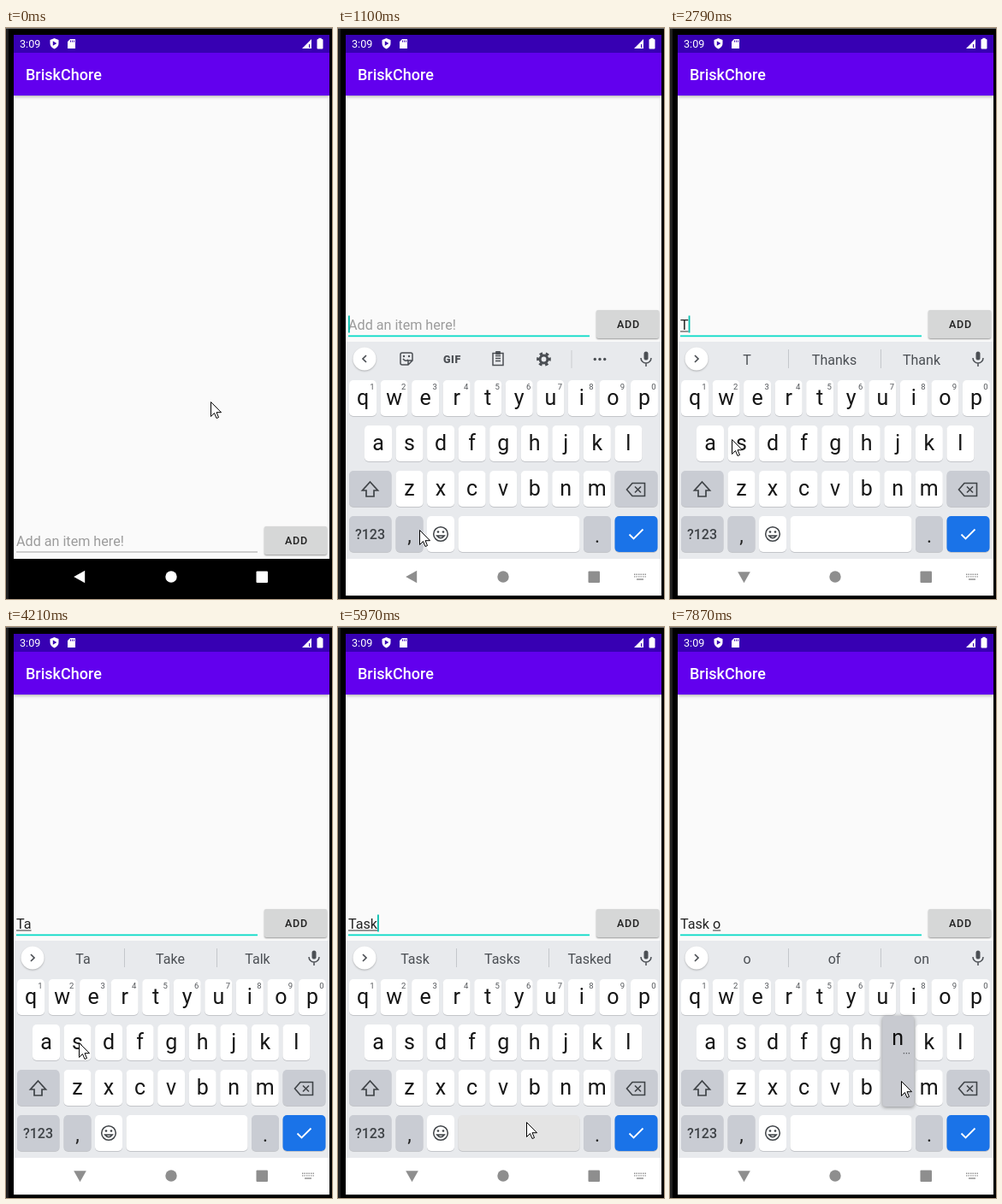
An HTML page with a canvas that plays this animation: 381 px wide and 668 px high, repeating every 7990 ms.

```html
<!DOCTYPE html>
<html lang="en">
<head>
<meta charset="utf-8">
<title>To-do list typing</title>
<style>
html, body { margin: 0; height: 100%; overflow: hidden; background: #000; }
canvas { display: block; width: 381px; height: 668px; }
</style>
</head>
<body>
<canvas id="stage"></canvas>
<script>
const W = 381, H = 668, LOOP = 7990;
const canvas = document.getElementById('stage');
const g = canvas.getContext('2d');
const dpr = window.devicePixelRatio || 1;
canvas.width = W * dpr;
canvas.height = H * dpr;

const ticks = [0];
for (const [a, b, n] of [[130, 1100, 8], [1220, 1760, 5], [2160, 2790, 6], [2940, 3090, 2],
  [3220, 4210, 8], [4360, 5330, 8], [5450, 5970, 5], [6120, 6380, 2], [6530, 6780, 2], [7060, 7870, 7]])
  for (let i = 0; i < n; i++) ticks.push(Math.round(a + (b - a) * i / (n - 1)));

const FOCUS = 680, OPEN = 960, OPENED = 1100;
const pointer = [[0, 239, 437], [680, 97, 587], [820, 97, 587], [1100, 95, 587], [1620, 35, 537],
  [2160, 35, 537], [2410, 172, 432], [2540, 172, 432], [2790, 72, 481], [3000, 42, 483],
  [3490, 42, 484], [3900, 85, 486], [4490, 85, 486], [5200, 304, 487], [5580, 304, 487],
  [5900, 220, 579], [6120, 220, 579], [6380, 311, 444], [6530, 318, 441], [7195, 320, 440],
  [7600, 270, 531], [LOOP, 270, 531]];

// [time, finished text, word being composed, suggestions]
const edits = [[FOCUS, '', '', null],
  [2540, '', 'T', ['T', 'Thanks', 'Thank']],
  [3490, '', 'Ta', ['Ta', 'Take', 'Talk']],
  [4490, '', 'Tas', ['Tas', 'Task', 'Taste']],
  [5570, '', 'Task', ['Task', 'Tasks', 'Tasked']],
  [6120, 'Task ', '', ['is', 'force', 'for']],
  [7190, 'Task ', 'o', ['o', 'of', 'on']]];
const presses = [[2160, 2290, 'shift'], [2410, 2540, 't'], [3350, 3490, 'a'], [4360, 4490, 's'],
  [5450, 5570, 'k'], [5970, 6120, 'space'], [7060, 7190, 'o'], [7870, LOOP, 'n']];

const rows = ['qwertyuiop', 'asdfghjkl', 'zxcvbnm'];
const rowX = [13, 31, 67.5], PITCH = 36.55, KEY_W = 32, KEY_H = 42;
const rowY = r => 412 + 53 * r;

function box(x, y, w, h, fill, r = 0) {
  g.fillStyle = fill;
  g.beginPath();
  g.roundRect(x, y, w, h, r);
  g.fill();
}
function disc(x, y, r, fill) {
  g.fillStyle = fill;
  g.beginPath();
  g.arc(x, y, r, 0, 7);
  g.fill();
}
function text(s, x, y, size, fill, align = 'left', weight = 400, spacing = 0) {
  g.font = `${weight} ${size}px Roboto, sans-serif`;
  g.letterSpacing = spacing + 'px';
  g.textAlign = align;
  g.fillStyle = fill;
  g.fillText(s, x, y);
}
// Path drawn around (x, y), filled and/or stroked
function icon(d, x, y, fill, stroke, width = 1.5) {
  const p = new Path2D(d);
  g.save();
  g.translate(x, y);
  if (fill) { g.fillStyle = fill; g.fill(p); }
  if (stroke) { g.strokeStyle = stroke; g.lineWidth = width; g.stroke(p); }
  g.restore();
}
function shadow(color, blur, dy, draw) {
  g.save();
  g.shadowColor = color;
  g.shadowBlur = blur * dpr;
  g.shadowOffsetY = dy * dpr;
  draw();
  g.restore();
}
const latest = (list, t) => list.filter(e => e[0] <= t).pop();

function pointerAt(t) {
  const i = Math.max(1, pointer.findIndex(p => p[0] > t));
  const [t0, x0, y0] = pointer[i - 1], [t1, x1, y1] = pointer[i];
  const u = (t - t0) / (t1 - t0), e = u * u * (3 - 2 * u);
  return [Math.round(x0 + (x1 - x0) * e), Math.round(y0 + (y1 - y0) * e)];
}

function appBars() {
  box(0, 0, W, H, '#000');
  box(0, 0, 3, H, '#202020');
  box(0, 0, W, 1, '#777');
  box(9, 8, 369, 613, '#fafafa');
  shadow('rgba(0,0,0,.35)', 4, 1, () => box(9, 29, 369, 50, '#6200ee'));
  box(0, 29, 9, 55, '#000');
  box(0, 29, 3, 55, '#202020');
  box(378, 29, 3, 55, '#000');
  box(9, 8, 369, 21, '#3700b3');
  text('3:09', 16, 23, 12.6, '#fff');
  icon('M0-6L5-4V0Q5 4 0 6.5Q-5 4-5 0V-4Z', 56.5, 18, '#fff');
  icon('M-1.7-2.7L2.8 0L-1.7 2.7Z', 56.5, 18, '#3700b3');
  icon('M-1.5-5.5H4.5V5.5H-4.5V-2.5Z', 76.5, 18.5, '#fff');
  for (let i = 0; i < 3; i++) box(75 + i * 2, 14.5, 1, 2, '#3700b3');
  icon('M0 11L11 0V11Z', 346, 13, '#fff');
  box(354, 19, 1, 4, '#3700b3');
  box(363.5, 13, 7, 11.5, '#fff', 1);
  box(365.3, 11.8, 3.4, 2, '#fff');
  text('BriskChore', 23, 61, 18, '#fff', 'left', 500);
}

function entry(t, dy) {
  const edit = latest(edits, t);
  g.save();
  g.translate(0, dy);
  shadow('rgba(0,0,0,.4)', 2, 1, () => box(302, 583, 73, 33, '#d6d7d7', 2));
  text('ADD', 326, 604, 12.5, '#222', 'left', 500, .8);
  if (edit) box(12, 612.5, 282, 1.7, t < OPEN ? '#35bfae' : '#03dac5');
  else box(12, 612.5, 282, 1, '#a2a2a2');
  const [start, done, word] = edit || [0, '', ''];
  if (done + word) {
    text(done + word, 12, 606, 16.15, '#222');
    const end = 12 + g.measureText(done + word).width;
    const from = 12 + g.measureText(done).width;
    if (word) box(from, 607.5, end - from, 1, '#333');
    caret(t - start, end);
  } else {
    text('Add an item here!', 12, 606, 16.15, '#9c9c9c');
    if (edit) caret(t - start, 12);
  }
  g.restore();
}
function caret(age, x) {
  if (age % 1000 < 500) box(x, 589.5, 1.8, 20, '#03bfae');
}

function navBar(t) {
  const open = t >= OPEN, focused = t >= FOCUS;
  const ink = focused ? '#8e8e8e' : '#fff';
  box(9, 621, 369, 43, open ? '#fff' : '#000');
  const turn = Math.min(1, Math.max(0, (t - 1100) / 390));
  g.save();
  g.translate(86.5, 642);
  g.rotate(-turn * Math.PI / 2);
  icon('M-7.3 0L5.7-7.3V7.3Z', 0, 0, ink);
  g.restore();
  disc(193, 642, 6.7, ink);
  box(292.5, 635.5, 13.5, 13.5, ink, 1);
  if (!focused) return;
  for (let r = 0; r < 2; r++)
    for (let c = 0; c < 6; c++) box(346 + c * 2.5, 638.5 + r * 2.7, 1.4, 1.4, ink);
  box(349, 644.3, 8, 1.4, ink);
}

function key(x, y, w, fill) {
  box(x, y + 1, w, KEY_H, '#c3c5c9', 5);
  box(x, y, w, KEY_H, fill, 5);
}

function strip(words) {
  const ink = '#4b4f54';
  shadow('rgba(0,0,0,.25)', 2, 1, () => disc(31, 387, 13.5, '#fff'));
  icon(words ? 'M-2-4L2 0L-2 4' : 'M2-4L-2 0L2 4', 31, 387, null, ink, 1.7);
  box(357.5, 378.5, 5, 10, ink, 2.5);
  icon('M-6-1A6 6 0 0 0 6-1M0 5V9', 360, 387, null, ink);
  if (words) {
    words.forEach((w, i) => text(w, 90 + 102 * i, 393.5, 16, ink, 'center'));
    box(138, 376, 1, 22, '#c4c7cb');
    box(246, 376, 1, 22, '#c4c7cb');
    return;
  }
  icon('M-5-7H5Q7-7 7-5V2L2 7H-5Q-7 7-7 5V-5Q-7-7-5-7ZM7 2H2V7M-4 0Q-1 4 2 1', 80, 387, null, ink);
  disc(77, 384, 1.2, ink);
  disc(83, 384, 1.2, ink);
  text('GIF', 133.5, 391.5, 12.5, ink, 'center', 900, .7);
  icon('M-6-6H6V8H-6ZM-3 0H3M-3 3H3M-3-3H3', 187, 386.5, null, ink);
  box(184, 378, 6, 4, ink, 1);
  g.save();
  g.strokeStyle = ink;
  g.lineWidth = 3;
  g.beginPath();
  g.arc(240.5, 387.5, 4.4, 0, 7);
  g.stroke();
  g.setLineDash([3.6, 3.6]);
  g.beginPath();
  g.arc(240.5, 387.5, 6.9, -.26, 6.02);
  g.stroke();
  g.restore();
  box(272.5, 377, 1, 21, '#c9ccd0');
  for (let i = -1; i < 2; i++) disc(306 + i * 5.7, 387.5, 1.7, ink);
}

function popup(x, y, letter) {
  shadow('rgba(0,0,0,.4)', 4, 1, () => box(x - 2, y - 63, 37, 106, '#c8cad0', 4));
  text(letter, x + 16, y - 29, 25, '#111', 'center');
  for (let i = 0; i < 3; i++) box(x + 22.5 + i * 3, y - 20, 1.3, 1.3, '#55585c');
}

function keyboard(t) {
  const press = latest(presses, t);
  const down = press && t < press[1] ? press[2] : '';
  const caps = t >= 2160 && t < 2540;
  const shape = c => caps ? c.toUpperCase() : c;
  const edit = latest(edits, t);
  const mod = '#c9ccd3', ink = '#3f4347';
  let held = null;

  box(9, 367, 369, 255, '#e8eaed');
  strip(edit && edit[3]);
  rows.forEach((row, r) => [...row].forEach((c, i) => {
    const x = rowX[r] + i * PITCH, y = rowY(r);
    key(x, y, KEY_W, '#fff');
    text(shape(c), x + 16, y + 29, 25, '#161616', 'center');
    if (!r) text((i + 1) % 10, x + 27, y + 11, 9.5, '#55585c', 'center');
    if (c === down) held = [x, y, shape(c)];
  }));

  key(13, 518, 49.5, down === 'shift' ? '#b3b6bd' : mod);
  icon('M0-9L9 1H4.5V8H-4.5V1H-9Z', 37.5, 540, caps ? ink : null, ink, 1.7);
  key(323.5, 518, 50, mod);
  icon('M-4-7.5H10.5V7.5H-4L-10.5 0ZM-1-3.5L6 3.5M6-3.5L-1 3.5', 348, 540, null, ink, 1.6);

  key(13, 571, 49.5, mod);
  text('?123', 37.5, 598, 16, ink, 'center', 500);
  key(67.5, 571, KEY_W, mod);
  text(',', 83.5, 602, 23, '#222', 'center');
  key(104, 571, KEY_W, '#fff');
  icon('M8.3 0A8.3 8.3 0 1 1-8.3 0A8.3 8.3 0 1 1 8.3 0M-4.3 2Q0 7.5 4.3 2Z', 120, 592, null, ink);
  disc(117, 589.5, 1.3, ink);
  disc(123, 589.5, 1.3, ink);
  key(140.5, 571, 142, down === 'space' ? '#e4e4e4' : '#fff');
  key(287, 571, KEY_W, mod);
  text('.', 303, 602, 23, '#222', 'center');
  key(323.5, 571, 50, '#1a73e8');
  icon('M-8 0L-3 5L8-6', 348.5, 592.5, null, '#fff', 1.8);
  if (held) popup(...held);
}

function draw(t) {
  g.setTransform(dpr, 0, 0, dpr, 0, 0);
  appBars();
  entry(t, t >= OPEN ? -253 : 0);
  if (t >= OPEN) {
    g.save();
    g.beginPath();
    g.rect(9, 330, 369, 292);
    g.clip();
    g.translate(0, t < OPENED - 20 ? 110 : 0);
    keyboard(t);
    g.restore();
  }
  navBar(t);
  const [x, y] = pointerAt(t);
  icon('M0 0V17L4 13L6.5 19L9 18L6.5 12.2H12Z', x + .5, y + .5, '#fff', '#000', 1);
}

function frame(now) {
  const t = now % LOOP;
  draw(ticks.filter(k => k <= t).pop() || 0);
  requestAnimationFrame(frame);
}
requestAnimationFrame(frame);
</script>
</body>
</html>
```
